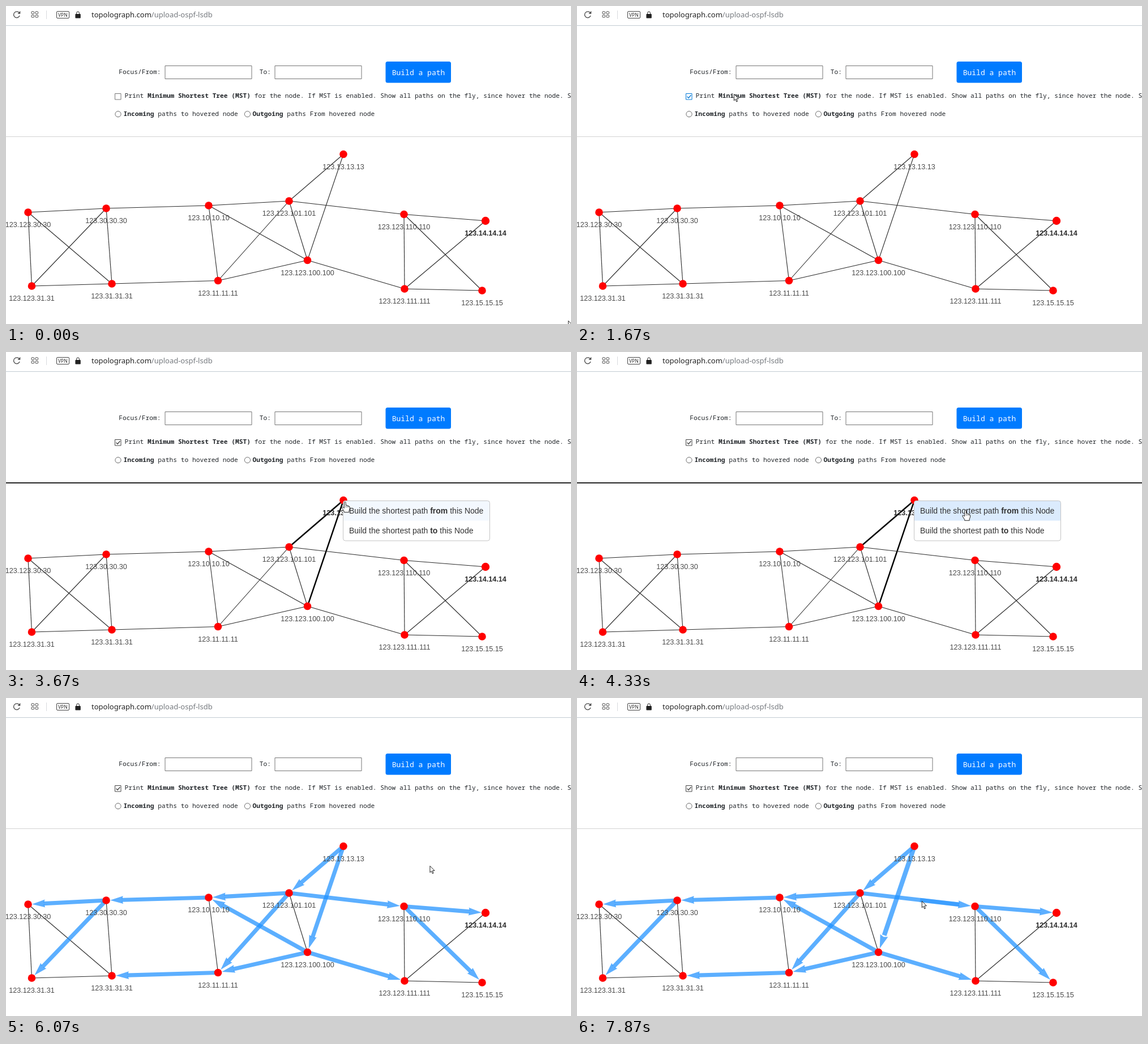
Write an HTML page with a canvas that moves like this. It is 998 px wide and 561 px high and loops after 8000 ms.

```html
<!DOCTYPE html>
<html lang="en">
<head>
<meta charset="utf-8">
<title>Shortest path tree</title>
<style>
html, body { margin: 0; width: 100%; height: 100%; overflow: hidden; background: #fff; }
canvas { display: block; }
</style>
</head>
<body>
<canvas id="stage" width="998" height="561"></canvas>
<script>
const ctx = document.getElementById('stage').getContext('2d');
const LOOP = 8000, STEP = 200 / 3;
const SANS = '"Liberation Sans", Arial, sans-serif';
const MONO = '"Noto Sans Mono", "DejaVu Sans Mono", monospace';
const UI = '"Noto Sans", "Open Sans", sans-serif';
const INK = '#212529', BLUE = 'rgba(30,144,255,0.72)';

const nodes = {
  A: [39, 364, '123.123.30.30'], B: [177, 357, '123.30.30.30'],
  C: [45.5, 494, '123.123.31.31'], D: [187, 490, '123.31.31.31'],
  E: [358, 352, '123.10.10.10'], F: [374.5, 484.5, '123.11.11.11'],
  G: [500, 344, '123.123.101.101'], H: [532.5, 448.5, '123.123.100.100'],
  I: [596, 261.5, '123.13.13.13'], J: [703, 367.5, '123.123.110.110'],
  K: [704, 499, '123.123.111.111'], L: [847, 379, '123.14.14.14'],
  M: [841, 502, '123.15.15.15']
};
const plainEdges = 'AC AD BD CD EF GH JK KL KM'.split(' ');
const treeEdges = 'IG IH GE GF GJ HE HF HK EB BA BC FD JL JM'.split(' ');

// Pointer moves: start, end, from x, y, to x, y
const moves = [
  [0, 1040, 993, 555, 277, 155],
  [1660, 2600, 277, 155, 597, 264],
  [3570, 4600, 597, 264, 700, 281],
  [5590, 6300, 700, 281, 762, 300],
  [6300, 6930, 762, 300, 532, 330],
  [6930, 7270, 532, 330, 524, 337],
  [7270, 7860, 524, 337, 609, 358]
];

const clamp = v => Math.max(0, Math.min(1, v));
const ease = p => p < 0.5 ? 2 * p * p : 1 - 2 * (1 - p) * (1 - p);

function pointer(t) {
  const m = moves.filter(m => t >= m[0]).pop();
  const p = ease(clamp((t - m[0]) / (m[1] - m[0])));
  return [m[2] + (m[4] - m[2]) * p, m[3] + (m[5] - m[3]) * p];
}

function line(x1, y1, x2, y2, color, width = 1) {
  ctx.strokeStyle = color;
  ctx.lineWidth = width;
  ctx.beginPath();
  ctx.moveTo(x1, y1);
  ctx.lineTo(x2, y2);
  ctx.stroke();
}

function box(x, y, w, h, color, r = 0) {
  ctx.strokeStyle = color;
  ctx.lineWidth = 1;
  ctx.beginPath();
  ctx.roundRect(x, y, w, h, r);
  ctx.stroke();
}

function disc(x, y, r, color) {
  ctx.fillStyle = color;
  ctx.beginPath();
  ctx.arc(x, y, r, 0, 7);
  ctx.fill();
}

function poly(pts) {
  ctx.beginPath();
  for (let i = 0; i < pts.length; i += 2) ctx.lineTo(pts[i], pts[i + 1]);
  ctx.closePath();
}

// Draws text in which *marked* parts are bold
function text(str, x, y, size, family, color = INK) {
  ctx.fillStyle = color;
  ctx.textAlign = 'left';
  str.split('*').forEach((part, i) => {
    ctx.font = `${i % 2 ? 'bold ' : ''}${size}px ${family}`;
    ctx.fillText(part, x, y);
    x += ctx.measureText(part).width;
  });
}

function toolbar() {
  const c = '#4a4a4a';
  ctx.strokeStyle = c;
  ctx.lineWidth = 1.3;
  ctx.beginPath();
  ctx.arc(19, 15.2, 5.4, 0.35, 5.5);
  ctx.stroke();
  ctx.fillStyle = c;
  poly([25.3, 8.8, 25.3, 13.8, 20.3, 13.8]);
  ctx.fill();
  for (const x of [45, 52]) for (const y of [9.8, 16]) box(x, y, 4.6, 4, c, 1);
  line(71.5, 8, 71.5, 23, '#d8dadd');
  box(89.5, 9.5, 22, 12, '#444', 1.5);
  text('VPN', 92, 19, 8.5, UI, '#333');
  box(124.5, 10, 5, 7, '#222', 2.5);
  ctx.fillStyle = '#222';
  ctx.beginPath();
  ctx.roundRect(122.4, 14, 9.4, 7.5, 1);
  ctx.fill();
  text('topolograph.com', 151, 20, 13, UI, '#222');
  text('/upload-ospf-lsdb', 151 + ctx.measureText('topolograph.com').width, 20, 13, UI, '#75797e');
  line(0, 34.5, 998, 34.5, '#c3cbd3');
}

function checkbox(t) {
  const hover = t > 790 && t < 1700, pressed = t > 1260 && t < 1320;
  const color = pressed ? '#005499' : hover ? '#0078d7' : t < 1320 ? '#767676' : '#444';
  if (pressed) {
    ctx.fillStyle = '#cce4f7';
    ctx.fillRect(192, 154, 12, 12);
  }
  box(192.5, 154.5, 10.5, 10.5, color);
  if (t < 1320) return;
  ctx.lineWidth = 1.4;
  ctx.beginPath();
  ctx.moveTo(194.5, 159.8);
  ctx.lineTo(197, 162.3);
  ctx.lineTo(201.4, 157.2);
  ctx.stroke();
}

function form(t) {
  text('Focus/From:', 199.3, 120, 11.24, MONO);
  box(281, 105.5, 153, 23, '#767676');
  text('To:', 447.8, 120, 11.24, MONO);
  box(475, 105.5, 153, 23, '#767676');
  ctx.fillStyle = '#007bff';
  ctx.beginPath();
  ctx.roundRect(670.5, 98, 115.5, 37.5, 3.5);
  ctx.fill();
  text('Build a path', 681.7, 121.6, 13, MONO, '#fff');
  checkbox(t);
  text('Print *Minimum Shortest Tree (MST)* for the node. If MST is enabled. ' +
    'Show all paths on the fly, since hover the node. Start', 209.6, 162, 11.24, MONO);
  for (const x of [198, 426.5]) box(x - 5.1, 185.6, 10.2, 10.2, '#6a6a6a', 5.1);
  text('*Incoming* paths to hovered node', 207.6, 194, 11.24, MONO);
  text('*Outgoing* paths From hovered node', 435.6, 194, 11.24, MONO);
}

function edge(id, width, color) {
  const [a, b] = [nodes[id[0]], nodes[id[1]]];
  line(a[0], a[1], b[0], b[1], color, width);
}

// Barbed arrow; "full" runs the shaft under the head
function arrow(id, full, width = 7.2, gap = 0) {
  const [a, b] = [nodes[id[0]], nodes[id[1]]];
  const dist = Math.hypot(b[0] - a[0], b[1] - a[1]);
  const tip = dist - 7, len = 23 + (width - 7.2);
  ctx.save();
  ctx.translate(a[0], a[1]);
  ctx.rotate(Math.atan2(b[1] - a[1], b[0] - a[0]));
  line(0, 0, full ? dist : tip - len * 0.9 - gap, 0, BLUE, width);
  ctx.fillStyle = BLUE;
  poly([tip, 0, tip - len, len * 0.3, tip - len * 0.9, 0, tip - len, -len * 0.3]);
  ctx.fill();
  ctx.restore();
}

function graph(t) {
  const tree = t > 4990, focus = t > 2590 && t < 5590;
  const wire = '#2b2b2b';
  plainEdges.forEach(id => edge(id, 1.1, wire));
  treeEdges.forEach(id => {
    if (!tree) {
      const hot = focus && id[0] === 'I';
      edge(id, hot ? 2.4 : 1.1, hot ? '#000' : wire);
    } else if (id === 'IG' && t > 6790 && t < 7320) {
      arrow(id, false, 9.5);
    } else if (id === 'IH' && t > 6720) {
      arrow(id, false, 8.2, 3);
    } else {
      arrow(id, t < 5590);
    }
  });
  if (t > 7660) line(606, 356.5, 675, 364.4, 'rgba(30,144,255,0.5)', 7.6);
  ctx.textAlign = 'center';
  for (const id in nodes) {
    const [x, y, name] = nodes[id];
    const bold = id === 'L' || (id === 'I' && focus);
    disc(x, y, id === 'L' ? 7.2 : 6.8, '#ff0000');
    ctx.font = `${bold ? 'bold ' : ''}12.6px ${SANS}`;
    ctx.fillStyle = bold ? '#2b2b2b' : '#4a4a4a';
    ctx.fillText(name, x, y + 26);
  }
}

function menu(t) {
  if (t < 3260 || t > 4860) return;
  ctx.save();
  ctx.globalAlpha = t < 3320 ? 0.5 : 1;
  ctx.fillStyle = '#fff';
  ctx.beginPath();
  ctx.roundRect(595.5, 262.5, 259, 70.5, 4);
  ctx.fill();
  ctx.save();
  ctx.clip();
  ctx.globalAlpha *= clamp((t - 3600) / 200);
  ctx.fillStyle = '#dbebfd';
  ctx.fillRect(595, 262, 260, 35.5);
  ctx.restore();
  box(595.5, 262.5, 259, 70.5, '#c4c4c4', 4);
  text('Build the shortest path *from* this Node', 606, 284.5, 14, SANS, '#333');
  text('Build the shortest path *to* this Node', 606, 319.5, 14, SANS, '#333');
  ctx.restore();
}

function cursor(t) {
  const [x, y] = pointer(t);
  const hand = t > 2590 && t < 4860;
  ctx.save();
  ctx.translate(x, y);
  ctx.fillStyle = '#fff';
  ctx.strokeStyle = '#222';
  ctx.lineWidth = 1;
  ctx.lineJoin = 'round';
  poly(hand
    ? [-1.4, 1, 0, 0, 1.3, 1, 1.4, 6, 3.6, 6, 4.2, 7, 6, 7, 6.6, 8, 8, 8.4, 8.5, 10,
       8.2, 13, 7, 16, 7, 18.5, -1.5, 18.5, -1.5, 17, -4.4, 12.4, -5.4, 10, -4, 9, -1.5, 11.2]
    : [0.3, 0.4, 0.3, 11.9, 2.9, 9.5, 4.7, 13.9, 6.5, 13.1, 4.7, 8.9, 8.4, 8.6]);
  ctx.fill();
  ctx.stroke();
  if (hand) for (const k of [1.4, 4, 6.4]) line(k, 7, k, 10, '#222', 0.7);
  ctx.restore();
}

function draw(t) {
  ctx.fillStyle = '#fff';
  ctx.fillRect(0, 0, 998, 561);
  toolbar();
  form(t);
  const active = t > 3120 && t < 4860;
  ctx.fillStyle = active ? '#000' : '#d3d3d3';
  ctx.fillRect(0, 230, 998, active ? 1.7 : 1);
  graph(t);
  menu(t);
  cursor(t);
}

const start = performance.now();
function tick() {
  const t = (performance.now() - start) % LOOP;
  draw(Math.floor((t + 4) / STEP) * STEP % LOOP);
  requestAnimationFrame(tick);
}
tick();
</script>
</body>
</html>
```
